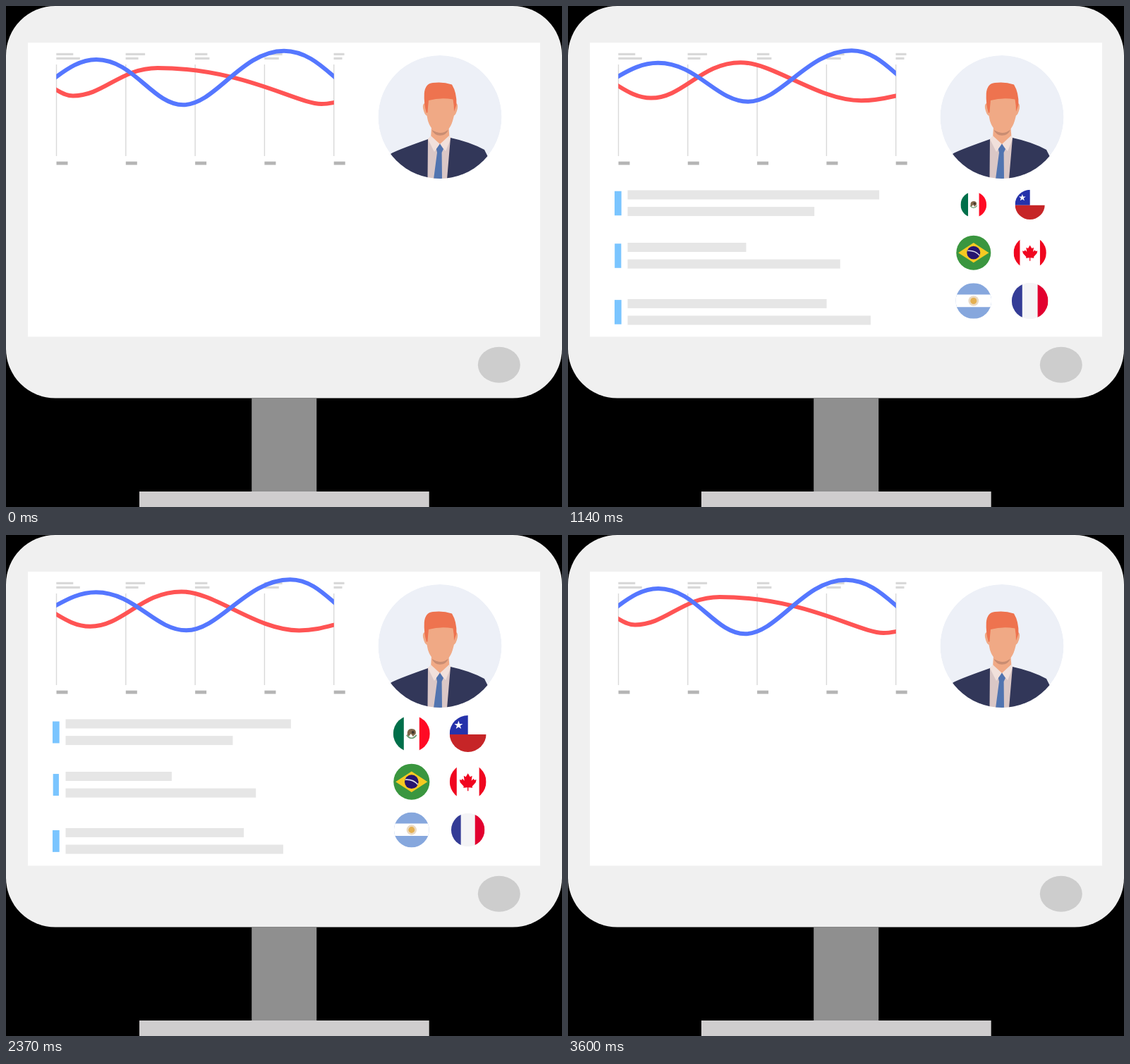
Animation of 788x711 px, one loop 3630 ms. Source, as an HTML page:

```html
<!DOCTYPE html>
<html lang="en">
<head>
<meta charset="utf-8">
<title>Dashboard monitor</title>
<style>
  html, body { margin: 0; width: 100%; height: 100%; overflow: hidden; background: #000; }
  svg { display: block; width: 788px; height: 711px; }
</style>
</head>
<body>
<svg viewBox="0 0 788 711">
  <defs>
    <clipPath id="face"><circle cx="615" cy="157.5" r="87.5"/></clipPath>
    <clipPath id="plot"><rect x="71.3" y="52" width="393.5" height="170"/></clipPath>
    <clipPath id="disc"><circle r="26"/></clipPath>
  </defs>

  <rect width="788" height="556.5" rx="70" fill="#f0f0f0"/>
  <rect x="31" y="52" width="726" height="417.3" fill="#fff"/>
  <ellipse cx="698.8" cy="509.3" rx="30" ry="25.5" fill="#cdcdcd"/>
  <rect x="348.2" y="556.5" width="92" height="133" fill="#8f8f8f"/>
  <rect x="189" y="689" width="410.7" height="22" fill="#cfcdce"/>

  <g id="grid"></g>
  <g clip-path="url(#plot)" fill="none" stroke-width="6">
    <path id="red" stroke="#ff5454"/>
    <path id="blue" stroke="#5577ff"/>
  </g>

  <g clip-path="url(#face)">
    <circle cx="615" cy="157.5" r="87.5" fill="#edf0f7"/>
    <path d="M598 188 L630 186 V246 H596Z" fill="#dac7c6"/>
    <path d="M603 172 H627.5 L628.5 187 L615 197 L602 188Z" fill="#f0a985"/>
    <path d="M603.5 176 Q615 183 627 175.5 Q624 183.5 615 183.8 Q607 183.5 603.5 176Z" fill="#c98d72"/>
    <path d="M602 184 L615 196 L607 207 L598 189Z M628 184 L615 196 L623 206 L631 187Z" fill="#f1e0db"/>
    <path d="M545 210 Q550 206 598 189 L597.5 246 H540Z M630 187 Q658 193 678 204 L684 216 L680 246 H625Z" fill="#323759"/>
    <path d="M615 195.5 L620 203 L617.6 208 L618 246 H606 L611 208 L609.8 203Z" fill="#5174b0"/>
    <path d="M595 138 Q590 137 591 145 Q593 155 597 156Z M636 138 Q641 137 640 145 Q638 155 634 156Z" fill="#f0a985"/>
    <path d="M595.5 128 H636 Q637 152 633 163 Q628 180 615.5 180 Q603 179 598 163 Q595 152 595.5 128Z" fill="#f0a985"/>
    <path d="M596 152 Q592 139 592.8 124 Q594 110 605 109 Q619 107 632 111.5 Q639 123 638.5 140 L635 150 Q635 140 633.5 132.5 Q616 129.5 599 134 Q598 143 597.5 151Z" fill="#ee734f"/>
  </g>

  <g id="list"></g>

  <!-- In order of appearance: France, Argentina, Brazil, Canada, Chile, Mexico -->
  <g id="flags">
    <g><g clip-path="url(#disc)">
      <path d="M-26-26H26V26H-26Z" fill="#f4f4f6"/>
      <path d="M-26-26H-11V26H-26Z" fill="#343c96"/>
      <path d="M11-26H26V26H11Z" fill="#e2002f"/>
    </g></g>
    <g><g clip-path="url(#disc)">
      <path d="M-26-26H26V26H-26Z" fill="#86a7dd"/>
      <path d="M-26-9.3H26V9H-26Z" fill="#fff"/>
      <circle r="7.5" fill="#ead9c2"/>
      <circle r="4.6" fill="#e4b052"/>
    </g></g>
    <g>
      <circle r="26" fill="#3a963f"/>
      <path d="M-23 0L0-15L23 0L0 15Z" fill="#f6ca22"/>
      <circle r="10" fill="#26156f"/>
      <path d="M-9-3Q2-4 9 4" fill="none" stroke="#dcdcea" stroke-width="1.6"/>
    </g>
    <g><g clip-path="url(#disc)">
      <path d="M-26-26H26V26H-26Z" fill="#fff"/>
      <path d="M-26-26H-16V26H-26Z M16-26H26V26H16Z" fill="#f0061f"/>
      <path fill="#f0061f" d="M0-12L3-7L6-8.5L5-1.5L8-4.5L9-2.5L12-3L11 1L6 6.5L6.5 8.5L.7 8V13H-.7V8L-6.5 8.5L-6 6.5L-11 1L-12-3L-9-2.5L-8-4.5L-5-1.5L-6-8.5L-3-7Z"/>
    </g></g>
    <g><g clip-path="url(#disc)">
      <path d="M-26-26H26V26H-26Z" fill="#fff"/>
      <path d="M-26-26H0V1H-26Z" fill="#2532aa"/>
      <path d="M-26 1H26V26H-26Z" fill="#c62527"/>
      <path id="star" fill="#fff"/>
    </g></g>
    <g><g clip-path="url(#disc)">
      <path d="M-26-26H26V26H-26Z" fill="#fff"/>
      <path d="M-26-26H-11V26H-26Z" fill="#006f4a"/>
      <path d="M11-26H26V26H11Z" fill="#ff0a24"/>
      <path d="M-6 2Q-7-7 0-7Q7-7 6 0L2 4L-1 0L-4 4Z" fill="#80664a"/>
      <path d="M-7 2Q0 11 7 2" fill="none" stroke="#719c75" stroke-width="1.8"/>
      <circle cx="2" cy="-2" r="2" fill="#3d352c"/>
    </g></g>
  </g>
</svg>
<script>
const LOOP = 3630, STEP = 30, HALF = 1800, LEFT = 71.3, RIGHT = 464.8;
const $ = id => document.getElementById(id);

function setAll(el, attrs) {
  for (const k in attrs) el.setAttribute(k, attrs[k]);
}

function rect(parent, x, y, width, height, fill) {
  const el = document.createElementNS('http://www.w3.org/2000/svg', 'rect');
  setAll(el, { x, y, width, height, fill });
  parent.append(el);
  return el;
}

const clamp = v => Math.min(1, Math.max(0, v));
const smooth = p => p * p * (3 - 2 * p);
const cubic = p => p < .5 ? 4 * p ** 3 : 1 - 4 * (1 - p) ** 3;
const ramp = (t, start, span) => cubic(clamp((t - start) / span));

// Chart columns, by the widths of their two label lines
[[24, 33.5], [27.5, 18], [17.5, 20.5], [25.5, 20.5], [15, 12]].forEach((widths, i) => {
  const x = LEFT + i * 98.3;
  widths.forEach((w, j) => rect($('grid'), x, 66.8 + 6 * j, w, 3.2, '#d9d9d9'));
  rect($('grid'), x - .5, 83, 1.4, 130, '#d9d9d9');
  rect($('grid'), x + .2, 220.7, 16, 4.8, '#b5b5b5');
});

// List rows: centre and the full widths of the two bars
const rows = [[280, 380, 282], [354.5, 179, 321], [434.4, 300.5, 367]].map(([y, ...widths]) => ({
  y, widths,
  mark: rect($('list'), 66, y, 9.7, 0, '#7ac5ff'),
  bars: widths.map((w, j) => rect($('list'), 84.5, y - 18.5 + 23.6 * j, 0, 13, '#e6e6e6'))
}));

// Flags follow one another in a snake from the bottom right
const flags = [...$('flags').children].map((el, k) => ({
  el,
  x: (k + 1 >> 1) % 2 ? 574.8 : 654.7,
  y: 418.5 - 68.3 * (k >> 1),
  start: 170 + 65 * k
}));

$('star').setAttribute('d', 'M' + Array.from({ length: 10 }, (_, i) => {
  const r = i % 2 ? 2.5 : 6.3, a = i * Math.PI / 5;
  return [-13.3 + r * Math.sin(a), -12 - r * Math.cos(a)].map(v => v.toFixed(2));
}).join('L') + 'Z');

// Pose: start y, three turning points, end y, handles of the last long arc.
// The red line bends through its middle pose.
const red = [
  [119, 95, 127.5, 215, 88, 447, 139, 137, .52, .15],
  [118, 116, 137.7, 229, 75.5, 405, 125, 123, .1, .38],
  [108.5, 123.5, 125, 264, 82.7, 419, 141.5, 129.5, .38, .38]
];
const blue = [
  [100.5, 128, 76, 251, 140.3, 394, 63.7, 100, .32, .42],
  [99.5, 127.5, 82.8, 257, 133.7, 405.5, 63, 94, .32, .42]
];

const mix = (a, b, s) => a.map((v, i) => v + (b[i] - v) * s);

// Bezier blend of any number of poses
function blend(poses, s) {
  while (poses.length > 1) poses = poses.slice(1).map((p, i) => mix(poses[i], p, s));
  return poses[0];
}

function wave([y0, x1, y1, x2, y2, x3, y3, y4, h, k], g, f) {
  const dx = x1 - LEFT, dy = y1 - y0, ex = RIGHT - x3, ey = y4 - y3;
  const arc = (xa, ya, xb, yb, out, into) =>
    ['C', xa + out * (xb - xa), ya, xb - into * (xb - xa), yb, xb, yb];
  return [
    'M', LEFT - .28 * dx, y0 - .47 * dy, 'L', LEFT, y0,
    'C', LEFT + .28 * dx, y0 + .47 * dy, x1 - .4 * dx, y1, x1, y1,
    ...arc(x1, y1, x2, y2, g, f),
    ...arc(x2, y2, x3, y3, h, k),
    'C', x3 + .42 * ex, y3, RIGHT - .28 * ex, y4 - .47 * ey, RIGHT, y4,
    'L', RIGHT + .28 * ex, y4 + .47 * ey
  ].join(' ');
}

function draw(t) {
  const s = smooth(clamp(1 - Math.abs(t - HALF) / HALF));
  $('red').setAttribute('d', wave(blend(red, s), .36, .44));
  $('blue').setAttribute('d', wave(blend(blue, s), .43, .35));

  const u = t % HALF;
  const size = t < 2 * HALF ? ramp(u, 0, 866) - ramp(u, 920, 885) : 0;
  rows.forEach(({ y, widths, mark, bars }, i) => {
    bars.forEach((bar, j) => bar.setAttribute('width', widths[j] * size));
    setAll(mark, { y: y - 18.4 * size, height: 36.8 * size });
    if (i === 1) setAll(mark, { x: 70.8 - 4.9 * size, width: 9.8 * size });
  });

  for (const { el, x, y, start } of flags) {
    const scale = ramp(t, start, 1110) - ramp(t, start + 1890, 1110);
    el.style.display = scale > .004 ? '' : 'none';
    el.setAttribute('transform', `translate(${x} ${y}) scale(${scale})`);
  }
}

const begin = performance.now();
function tick() {
  const t = Math.max(0, performance.now() - begin) % LOOP;
  draw(Math.floor(t / STEP) * STEP);
  requestAnimationFrame(tick);
}
tick();
</script>
</body>
</html>
```
